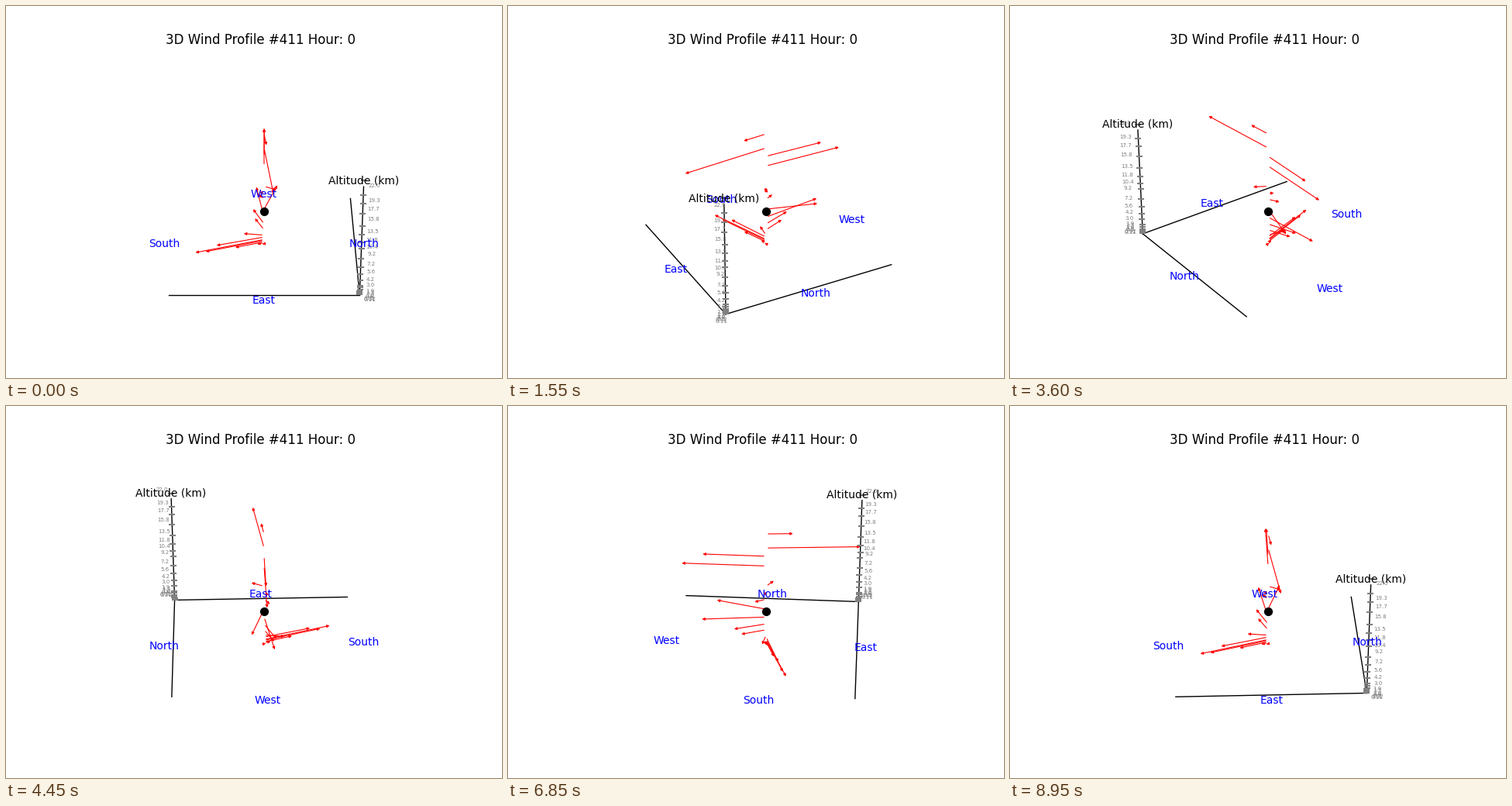
A matplotlib script for the animation above (9000 ms loop, 640 by 480 pixels).

```python
import numpy as np
import matplotlib.pyplot as plt
from matplotlib.animation import FuncAnimation
from matplotlib.patches import FancyArrowPatch

W, H, DPI = 640, 480, 100
FRAMES, INTERVAL = 180, 50

# View: camera distance, elevation and pixel scale of the 3D scene
DIST = 10
SCALE = 369.6 / 0.185
CX, CY = 333.0, 237.4
SIN_E, COS_E = 0.5, np.sqrt(3) / 2

EDGE = 0.598           # half width of the ground square
OUT = 1.1 * EDGE       # radius of the labels
Z_STEP = 0.0374        # scene units per km
MID = 11.055           # altitude at the height of the view centre

LEVELS = [0.11, 0.32, 0.5, 0.8, 1.0, 1.5, 1.9, 3.0, 4.2, 5.6, 7.2,
          9.2, 10.4, 11.8, 13.5, 15.8, 17.7, 19.3, 22.0]
TOP = LEVELS[-1]

# Wind bands: centre level, width, strength to the east and north
JETS = [
    (3.8, 2.0, 0.17, -0.47),
    (7.3, 1.3, -0.20, -0.04),
    (9.55, 1.0, -0.50, 0.0),
    (15.45, 0.65, -0.91, 0.0),
    (17.25, 0.65, 0.72, 0.07),
]
COMPASS = {"East": (OUT, 0), "West": (-OUT, 0),
           "North": (0, OUT), "South": (0, -OUT)}


def wind(n):
    """East and north wind at level n: smooth jets and a mid-air ripple."""
    flow = sum(np.exp(-((n - centre) / width) ** 2) * np.array(power)
               for centre, width, *power in JETS)
    if 8 <= n <= 13:
        flow = flow + np.cos(2 * np.pi * (n - 10) / 3) * np.array([0.06, 0.1])
    return flow


def project(x, y, km, azim):
    """Scene point to stage pixels for a camera at the given azimuth."""
    s, c = np.sin(azim), np.cos(azim)
    z = Z_STEP * (km - MID)
    side = y * c - x * s
    near = x * c + y * s
    k = SCALE / (DIST - COS_E * near - SIN_E * z)
    return CX + k * side, CY - k * (COS_E * z - SIN_E * near)


fig = plt.figure(figsize=(W / DPI, H / DPI), dpi=DPI, facecolor="white")
ax = fig.add_axes([0, 0, 1, 1])
ax.set_xlim(0, W)
ax.set_ylim(H, 0)
ax.axis("off")


def label(text, size, color):
    return ax.text(0, 0, text, fontsize=size, color=color,
                   ha="center", va="center", zorder=5)


ax.text(328, 49.3, "3D Wind Profile #411 Hour: 0", fontsize=12, ha="center")

axis_ends = [(-EDGE, EDGE, 0), (EDGE, -EDGE, 0), (EDGE, EDGE, 0.95 * TOP)]
axis_lines = [ax.plot([], [], color="black", lw=1, zorder=2)[0]
              for _ in axis_ends]

arrows = []
for n, km in enumerate(LEVELS):
    u, v = wind(n)
    if np.hypot(u, v) > 0.01:    # calm levels get no arrow
        arrow = FancyArrowPatch((0, 0), (1, 1), arrowstyle="-|>", color="red",
                                mutation_scale=5, lw=0.8, shrinkB=3, zorder=3)
        ax.add_patch(arrow)
        arrows.append((arrow, km, u, v))

ax.scatter([CX], [265.2], s=50, color="black", zorder=4)

ticks, = ax.plot([], [], ls="none", marker="_", ms=6, mew=1.5,
                 color="gray", zorder=4)
tick_labels = [label(str(km), 5, "gray") for km in LEVELS]
compass_labels = [label(name, 10, "blue") for name in COMPASS]
altitude_label = label("Altitude (km)", 10, "black")


def update(frame):
    azim = 2 * np.pi * frame / FRAMES
    corner = project(EDGE, EDGE, 0, azim)
    for line, end in zip(axis_lines, axis_ends):
        line.set_data(*zip(corner, project(*end, azim)))
    for arrow, km, u, v in arrows:
        arrow.set_positions(project(0, 0, km, azim), project(u, v, km, azim))
    ticks.set_data(*project(EDGE, EDGE, np.array(LEVELS), azim))
    for text, km in zip(tick_labels, LEVELS):
        text.set_position(project(OUT, OUT, km, azim))
    for text, (x, y) in zip(compass_labels, COMPASS.values()):
        text.set_position(project(x, y, 0, azim))
    altitude_label.set_position(project(EDGE, EDGE, TOP, azim))
    return []


anim = FuncAnimation(fig, update, frames=FRAMES, interval=INTERVAL,
                     repeat=True, repeat_delay=0, blit=False)
plt.show()
```
